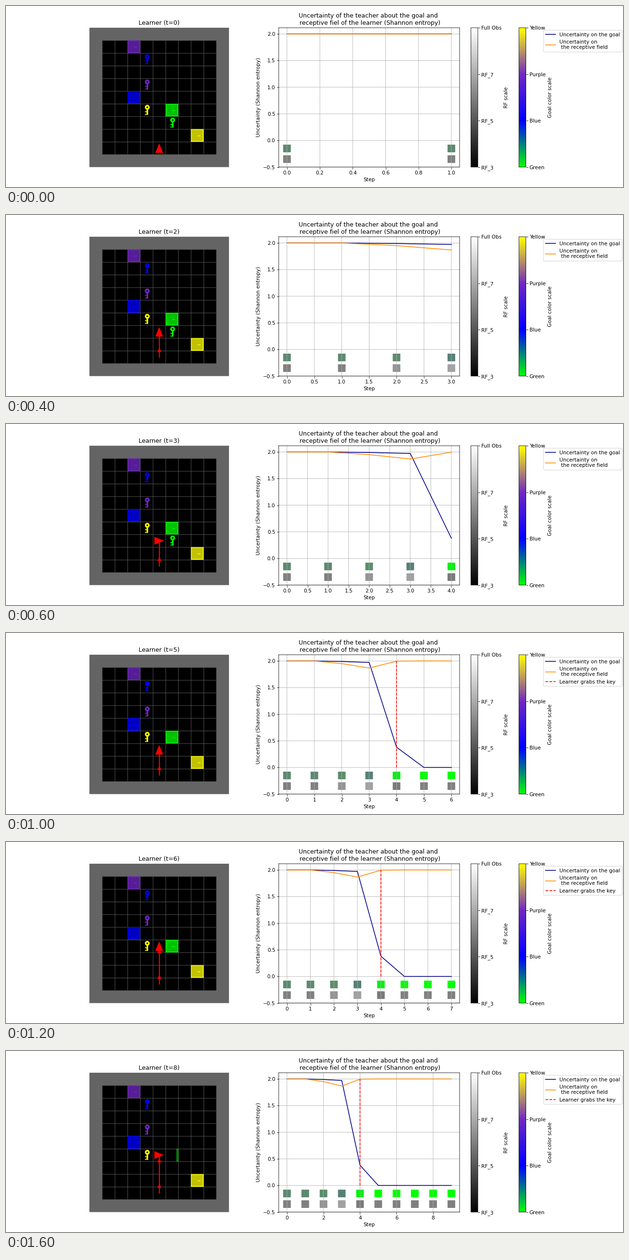
A matplotlib script for the animation above (1.8 s loop, 1280x376 px).

```python
import numpy as np
import matplotlib.pyplot as plt
from matplotlib.animation import FuncAnimation
from matplotlib.cm import ScalarMappable
from matplotlib.colors import LinearSegmentedColormap, Normalize
from matplotlib.patches import Circle, Polygon, Rectangle

WIDTH, HEIGHT, DPI = 1280, 376, 75.25
EPS = 1e-4  # keeps the canvas from truncating to one pixel less
STEPS, INTERVAL = 9, 200

GREEN, BLUE, PURPLE, YELLOW = [
    np.array(c) / 255 for c in ((0, 255, 0), (0, 0, 255), (112, 39, 195), (255, 255, 0))
]
WALL = (100 / 255,) * 3
CELLS = 11

DOORS = [(3, 1, PURPLE), (3, 5, BLUE), (6, 6, GREEN), (8, 8, YELLOW)]
KEYS = [(4, 2, BLUE), (4, 4, PURPLE), (4, 6, YELLOW), (6, 7, GREEN)]
ROWS = [9, 8, 7, 7, 7, 7, 6, 6, 6]
FACING_RIGHT = {3, 4, 7, 8}
GRAB_STEP, OPEN_STEP = 4, 8

GOAL = [2, 2, 1.99, 1.972, 0.38] + [0] * 5
FIELD = [2, 2, 1.95, 1.868, 1.996] + [2] * 5
GOAL_COLORS = (
    [(0.36, 0.537, 0.44)] * 2
    + [(0.36, 0.55, 0.415), (0.34, 0.50, 0.465), (0.03, 0.94, 0.07)]
    + [(0, 1, 0)] * 5
)
FIELD_COLORS = [(g,) * 3 for g in [0.5, 0.5, 0.58, 0.63, 0.48] + [0.5] * 5]

fig, (world, chart) = plt.subplots(
    1, 2, width_ratios=[0.35, 0.65],
    figsize=((WIDTH + EPS) / DPI, (HEIGHT + EPS) / DPI), dpi=DPI,
)


def add_bar(cmap, ticks, label):
    bar = fig.colorbar(ScalarMappable(Normalize(0, 3), cmap), ax=chart)
    bar.set_ticks(range(4), labels=ticks)
    bar.set_label(label)


add_bar(
    LinearSegmentedColormap.from_list("goal", [GREEN, BLUE, PURPLE, YELLOW]),
    ["Green", "Blue", "Purple", "Yellow"],
    "Goal color scale",
)
add_bar("gray", ["RF_3", "RF_5", "RF_7", "Full Obs"], "RF scale")


def rect(x0, x1, y0, y1, color):
    world.add_patch(Rectangle((x0, y0), x1 - x0, y1 - y0, fc=color, lw=0))


def draw_door(x, y, color, is_open):
    if is_open:
        rect(x + 0.87, x + 1, y, y + 1, color)
        rect(x + 0.91, x + 0.96, y + 0.03, y + 0.97, "black")
        return
    rect(x, x + 1, y, y + 1, color)
    rect(x + 0.06, x + 0.94, y + 0.06, y + 0.94, 0.76 * color)
    rect(x + 0.52, x + 0.75, y + 0.50, y + 0.56, color)


def draw_key(x, y, color):
    rect(x + 0.50, x + 0.63, y + 0.31, y + 0.88, color)
    rect(x + 0.38, x + 0.50, y + 0.59, y + 0.66, color)
    rect(x + 0.38, x + 0.50, y + 0.81, y + 0.88, color)
    world.add_patch(Circle((x + 0.56, y + 0.28), 0.19, fc=color, lw=0))
    world.add_patch(Circle((x + 0.56, y + 0.28), 0.064, fc="black", lw=0))


def draw_agent(row, right):
    points = np.array([(-0.38, -0.31), (0.37, 0), (-0.38, 0.31)])
    if not right:
        points = np.column_stack([points[:, 1], -points[:, 0]])
    world.add_patch(Polygon(points + (5.5, row + 0.5), fc="red", lw=0))


def draw_trail(row):
    if row == 9:
        return
    x = 5.515
    rect(x - 0.04, x + 0.04, row + 0.6, 9.54, "red")
    for tip, reached in ((8.74, 8), (6.72, 6)):
        if row <= reached:
            head = [(x, tip), (x - 0.15, tip + 0.36), (x + 0.15, tip + 0.36)]
            world.add_patch(Polygon(head, fc="red", lw=0))


def draw_world(t):
    world.clear()
    world.set(xlim=(0, CELLS), ylim=(CELLS, 0), aspect="equal", title=f"Learner (t={t})")
    world.axis("off")
    rect(0, CELLS, 0, CELLS, WALL)
    rect(1, CELLS - 1, 1, CELLS - 1, "black")
    for i in range(1, CELLS - 1):
        rect(i, i + 0.031, 1, CELLS - 1, WALL)
        rect(1, CELLS - 1, i, i + 0.031, WALL)
    for x, y, color in DOORS:
        draw_door(x, y, color, color is GREEN and t >= OPEN_STEP)
    for x, y, color in KEYS:
        if color is not GREEN or t < GRAB_STEP:
            draw_key(x, y, color)
    draw_trail(ROWS[t])
    draw_agent(ROWS[t], t in FACING_RIGHT)


def draw_chart(t):
    n = t + 2
    steps = np.arange(n)
    chart.clear()
    chart.plot(steps, GOAL[:n], color="darkblue", label="Uncertainty on the goal")
    chart.plot(steps, FIELD[:n], color="darkorange",
               label="Uncertainty on \n the receptive field")
    for y, colors in ((-0.15, GOAL_COLORS), (-0.35, FIELD_COLORS)):
        chart.scatter(steps, [y] * n, s=200, marker="s", c=colors[:n])
    if t >= GRAB_STEP:
        chart.vlines(GRAB_STEP, 0, 2, color="red", linestyle="--",
                     label="Learner grabs the key")
    margin = 0.05 * (n - 1)
    chart.set(
        xlim=(-margin, n - 1 + margin),
        ylim=(-0.5, 2.1175),
        xlabel="Step",
        ylabel="Uncertainty (Shannon entropy)",
        title="Uncertainty of the teacher about the goal and \n"
              " receptive fiel of the learner (Shannon entropy)",
    )
    chart.grid(True)
    chart.legend(loc="upper left", bbox_to_anchor=(1.45, 1))


def draw(t):
    draw_world(t)
    draw_chart(t)
    # Keep edges at their true subpixel positions.
    for artist in fig.findobj():
        artist.set_snap(False)
    return []


anim = FuncAnimation(fig, draw, frames=STEPS, interval=INTERVAL, repeat=True, repeat_delay=0)
plt.show()
```
